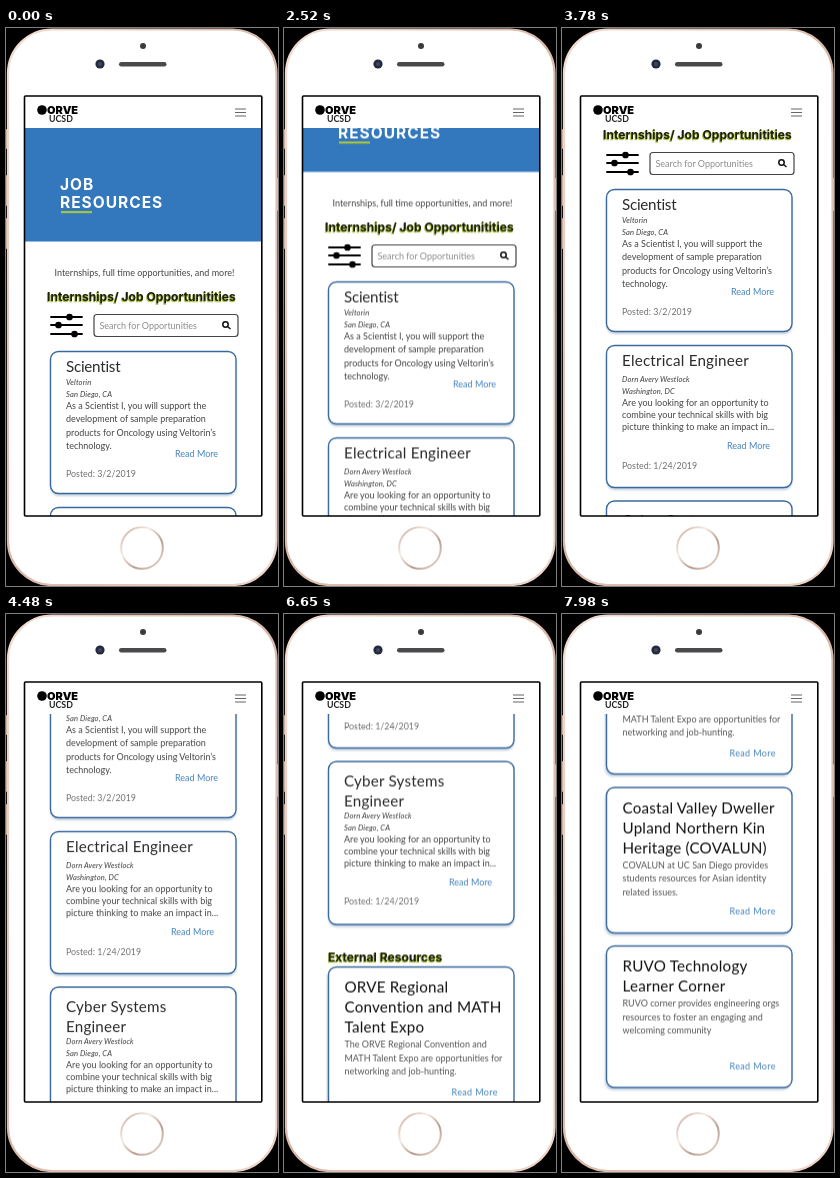
Animation, 272 px wide and 558 px high, one loop 8000 ms. Source, as an HTML page:

```html
<!DOCTYPE html>
<html lang="en">
<head>
<meta charset="utf-8">
<title>Job resources on a phone</title>
<style>
  html, body { margin: 0; width: 100%; height: 100%; overflow: hidden; background: #000; }
  svg { display: block; width: 100%; height: 100%; }
  text { font: 9px Lato, sans-serif; fill: #444; white-space: pre; }
  .hero { font: 700 15.5px Inter, sans-serif; letter-spacing: 1px; fill: #fff; }
  .heading { font: 700 12.1px Inter, sans-serif; fill: #1c1f14; }
  .glow { fill: #a9bf3c; stroke: #a9bf3c; stroke-width: .7px; }
  .title { font-size: 15.2px; letter-spacing: .2px; fill: #2b2b2b; }
  .tight { letter-spacing: -.25px; }
  .dark { fill: #111; }
  .firm { font-size: 7.6px; font-style: italic; letter-spacing: .1px; fill: #3c3c3c; }
  .soft { fill: #555; }
  .date { font-size: 8.85px; fill: #707070; }
  .link { fill: #4482bd; }
  .wide { letter-spacing: .35px; }
  .hint { fill: #8c8c8c; }
  .brand { font: 900 11px Inter, sans-serif; fill: #000; }
  .campus { font-weight: 700; font-size: 8.8px; fill: #222; }
  .card { fill: #fff; stroke: #3a699d; stroke-width: 1.4px; }
  .shade { fill: #8ba5c2; opacity: .55; filter: blur(1px); }
  #page { animation: scroll 8s ease-in-out infinite; }
  @keyframes scroll {
    0%, 21.875% { transform: translateY(0); }
    42.875%, 48.75% { transform: translateY(-162px); }
    59.5%, 69.5% { transform: translateY(-290px); }
    77.875%, 83.5% { transform: translateY(-487.5px); }
    89.25%, 95.75% { transform: translateY(-660px); }
    99.6%, 100% { transform: translateY(-826.5px); }
  }
</style>
</head>
<body>
<svg viewBox="0 0 272 558">
  <defs>
    <linearGradient id="rim" x2="1" y2="1">
      <stop offset="0" stop-color="#f3ddd2"/><stop offset=".5" stop-color="#d9b8a8"/><stop offset="1" stop-color="#efd6ca"/>
    </linearGradient>
    <linearGradient id="ring" x2="1" y2="1">
      <stop offset="0" stop-color="#c9aa9b"/><stop offset=".35" stop-color="#f6ece7"/>
      <stop offset=".65" stop-color="#b99c8e"/><stop offset="1" stop-color="#f1e4dd"/>
    </linearGradient>
    <clipPath id="view"><rect x="19" y="100" width="236.500" height="387.500"/></clipPath>
  </defs>

  <g fill="#cfb0a1">
    <rect x="0" y="101" width="4" height="20" rx="1"/>
    <rect x="0" y="147" width="4" height="31" rx="1"/>
    <rect x="0" y="190" width="4" height="31" rx="1"/>
    <rect x="268" y="150" width="4" height="33" rx="1"/>
  </g>
  <rect x="2" y="1.500" width="268.500" height="555.500" rx="44" fill="#fff" stroke="url(#rim)" stroke-width="2.200"/>
  <circle cx="137" cy="18" r="3" fill="#3b3b3d"/>
  <circle cx="94" cy="36" r="4.600" fill="#26293a"/>
  <circle cx="94" cy="36" r="2" fill="#3c4668"/>
  <rect x="113" y="34" width="47.500" height="4.500" rx="2.250" fill="#4a4a4c"/>
  <circle cx="136" cy="520" r="20.800" fill="#fff" stroke="url(#ring)" stroke-width="2"/>

  <rect x="18" y="68" width="238" height="420" fill="#fff"/>
  <g clip-path="url(#view)">
    <g id="page">
      <rect x="19" y="90" width="237" height="123.500" fill="#3377bd"/>
      <rect x="55" y="183" width="31" height="2.200" fill="#a9c23f"/>
      <g stroke="#000" stroke-width="1.900" stroke-linecap="round">
        <path d="M45 289H76M45 297H76M45 306H76"/>
        <circle cx="63.500" cy="289" r="2.400"/>
        <circle cx="52.500" cy="297" r="2.400"/>
        <circle cx="68.500" cy="306" r="2.400"/>
      </g>
      <rect x="88" y="286.500" width="144" height="22" rx="3" fill="#fff" stroke="#444" stroke-width="1.200"/>
      <g fill="none" stroke="#111" stroke-width="1.500">
        <circle cx="219.500" cy="296.500" r="2.700"/><path d="M221.500 298.500L224.500 301"/>
      </g>
    </g>
  </g>

  <circle cx="36" cy="82" r="4.800"/>
  <g id="bar"></g>
  <path d="M229 81H240M229 84.500H240M229 88H240" stroke="#666" stroke-width="1.100"/>
  <rect x="18.500" y="68" width="237.300" height="420" rx="1" fill="none" stroke="#000" stroke-width="1.600"/>
</svg>
<script>
  const page = document.getElementById('page');

  function add(parent, tag, attrs, content = '') {
    const el = document.createElementNS('http://www.w3.org/2000/svg', tag);
    for (const name in attrs) el.setAttribute(name, attrs[name]);
    el.textContent = content;
    parent.append(el);
  }

  const write = (x, y, content, style = '', parent = page) =>
    add(parent, 'text', { x, y, class: style }, content);

  const lines = (x, y, step, list, style) =>
    list.forEach((line, i) => write(x, y + i * step, line, style));

  function heading(x, y, content) {
    write(x - .5, y + 1.3, content, 'heading glow');
    write(x, y, content, 'heading');
  }

  function card(top, bottom, side) {
    const box = { width: 185.5, height: bottom - top, rx: 8 };
    add(page, 'rect', { ...box, x: 44.5 + side, y: top + 2.5, class: 'shade' });
    add(page, 'rect', { ...box, x: 44.5, y: top, class: 'card' });
  }

  function job({ top, bottom, title, style = '', firm, city, body, step, bodyY, more, date }) {
    card(top, bottom, 0);
    lines(60, top + 20.8 + (title.length > 1 ? 4.2 : 0), 20, title, 'title ' + style);
    write(60, bodyY - 24.5, firm, 'firm');
    write(60, bodyY - 12.5, city, 'firm');
    lines(60, bodyY, step, body);
    write(more[0], more[1], 'Read More', 'link');
    write(60, more[1] + 19.5, 'Posted: ' + date, 'date');
  }

  function resource({ top, bottom, title, body, more }) {
    card(top, bottom, -1.5);
    lines(60.5, top + 25.5, 20.1, title, 'title dark');
    lines(60.5, top + 20.5 + title.length * 20, 13.7, body, 'soft');
    write(167.5, more, 'Read More', 'link wide');
  }

  write(41, 86, 'ORVE', 'brand', document.getElementById('bar'));
  write(43, 94, 'UCSD', 'campus', document.getElementById('bar'));

  lines(54, 162, 18, ['JOB', 'RESOURCES'], 'hero');
  write(48.5, 248, 'Internships, full time opportunities, and more!');
  heading(41, 273, 'Internships/ Job Opportunitities');
  write(93.5, 300.5, 'Search for Opportunities', 'hint');

  const pitch = [
    'Are you looking for an opportunity to',
    'combine your technical skills with big',
    'picture thinking to make an impact in...'
  ];
  const employer = 'Dorn Avery Westlock';

  job({
    top: 323.5, bottom: 465.5, title: ['Scientist'], style: 'tight',
    firm: 'Veltorin', city: 'San Diego, CA',
    body: ['As a Scientist I, you will support the', 'development of sample preparation',
      'products for Oncology using Veltorin’s', 'technology.'],
    step: 13.3, bodyY: 381, more: [169, 429], date: '3/2/2019'
  });
  job({
    top: 479.5, bottom: 621.5, title: ['Electrical Engineer'],
    firm: employer, city: 'Washington, DC', body: pitch,
    step: 12.2, bodyY: 540, more: [165, 583], date: '1/24/2019'
  });
  job({
    top: 635, bottom: 798, title: ['Cyber Systems', 'Engineer'],
    firm: employer, city: 'San Diego, CA', body: pitch,
    step: 12.2, bodyY: 716, more: [165, 758.5], date: '1/24/2019'
  });

  heading(44, 834.8, 'External Resources');
  resource({
    top: 840.5, bottom: 986.5, more: 968.5,
    title: ['ORVE Regional', 'Convention and MATH', 'Talent Expo'],
    body: ['The ORVE Regional Convention and', 'MATH Talent Expo are opportunities for',
      'networking and job-hunting.']
  });
  resource({
    top: 1000, bottom: 1145.5, more: 1127,
    title: ['Coastal Valley Dweller', 'Upland Northern Kin', 'Heritage (COVALUN)'],
    body: ['COVALUN at UC San Diego provides', 'students resources for Asian identity',
      'related issues.']
  });
  resource({
    top: 1158.5, bottom: 1300, more: 1281.5,
    title: ['RUVO Technology', 'Learner Corner'],
    body: ['RUVO corner provides engineering orgs', 'resources to foster an engaging and',
      'welcoming community']
  });
</script>
</body>
</html>
```
